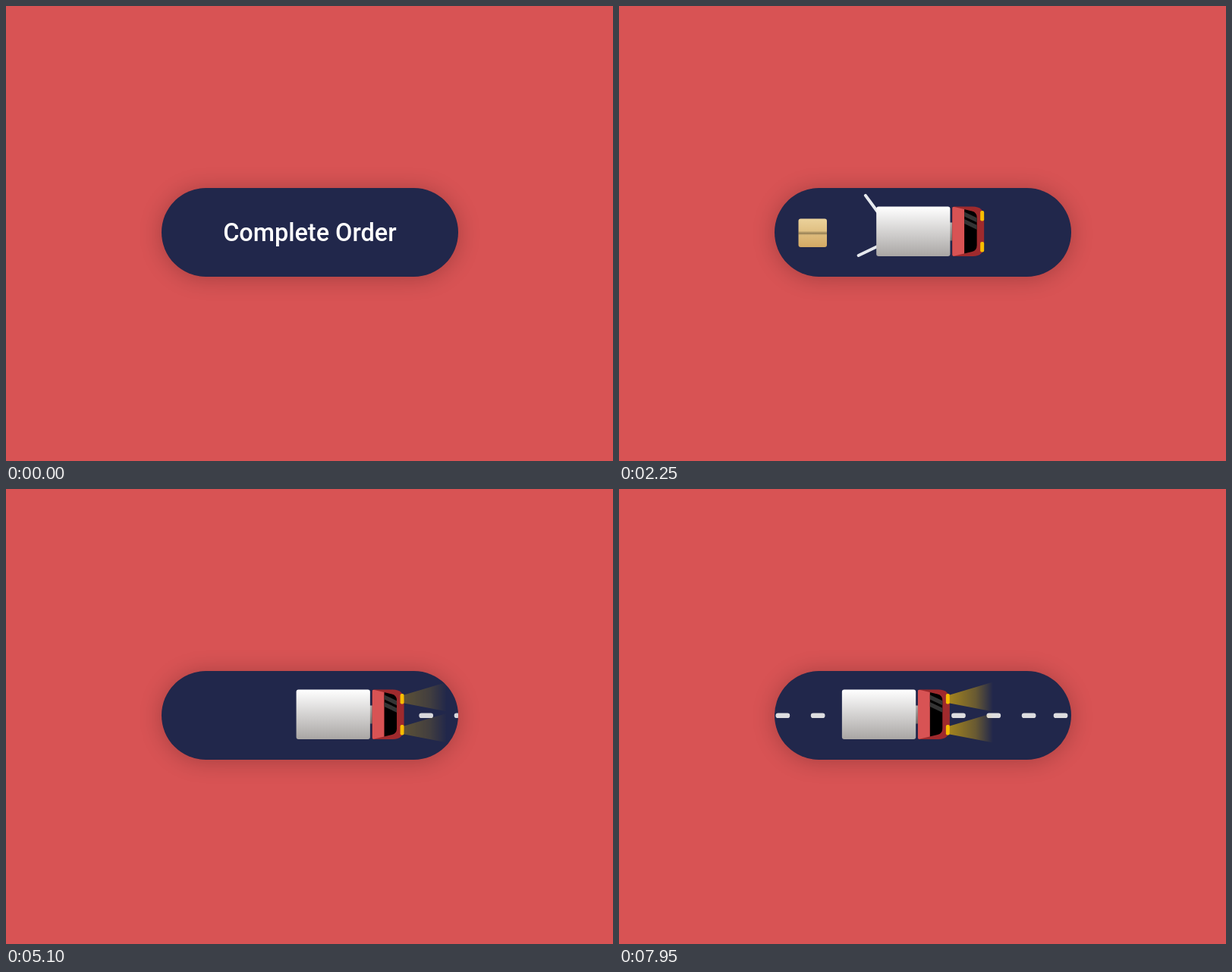
Animation, 800 px wide and 600 px high, one loop 8000 ms. Source, as an HTML page:

```html
<!DOCTYPE html>
<html lang="en">
<head>
<meta charset="utf-8">
<title>Complete Order</title>
<style>
  html, body { margin: 0; width: 100%; height: 100%; overflow: hidden; background: #d85354; }
  #button {
    position: absolute; left: 204.5px; top: 239.5px; width: 391.8px; height: 117.6px;
    border-radius: 58.8px; overflow: hidden; background: #21274b;
    box-shadow: 0 2px 30px rgba(0, 0, 0, .24);
  }
  #label {
    position: absolute; inset: 0; text-align: center; color: #fff;
    font: 500 32.4px/119px Roboto, sans-serif;
  }
  svg { position: absolute; inset: 0; width: 100%; height: 100%; }
</style>
</head>
<body>
<div id="button">
  <div id="label">Complete Order</div>
  <svg viewBox="204.5 239.5 391.8 117.6">
    <defs>
      <linearGradient id="trailer" x2="0" y2="1"><stop stop-color="#fff"/><stop offset="1" stop-color="#a9a6a4"/></linearGradient>
      <linearGradient id="hitch" x2="0" y2="1"><stop stop-color="#b0adab"/><stop offset="1" stop-color="#706d6b"/></linearGradient>
      <linearGradient id="carton" x2="0" y2="1"><stop stop-color="#ebd29b"/><stop offset="1" stop-color="#d3a964"/></linearGradient>
      <linearGradient id="beam">
        <stop stop-color="#f8c000" stop-opacity=".6"/>
        <stop offset=".6" stop-color="#f8c000" stop-opacity=".33"/>
        <stop offset="1" stop-color="#f8c000" stop-opacity="0"/>
      </linearGradient>
      <clipPath id="panel"><path d="M102 .2Q100 0 100 2V63.5Q100 65.5 102 65.300L126 59.500Q132.5 58 132.5 51V14.500Q132.5 7.500 126 6Z"/></clipPath>
    </defs>
    <g id="lines" fill="#dddde0"></g>
    <g id="box">
      <rect width="37.5" height="37.5" y="280" rx="3" fill="url(#carton)"/>
      <path d="M0 296.5h37.5v5H0z" fill="#000" opacity=".1"/>
      <path d="M0 298.3h37.5v1.6H0z" fill="#000" opacity=".25"/>
    </g>
    <g id="truck">
      <g stroke="#e6e9ee" stroke-width="4" stroke-linecap="round">
        <path id="doorTop" d="M3.5 9.5h-30"/>
        <path id="doorBottom" d="M3.5 51.5h-30"/>
      </g>
      <rect x="96" y="21" width="5" height="24" fill="url(#hitch)"/>
      <rect width="97.3" height="65.5" rx="3" fill="url(#trailer)"/>
      <path d="M103 0H127Q142 0 142 15V50.5Q142 65.5 127 65.5H103Q100 65.5 100 62.5V3Q100 0 103 0Z" fill="#9f2a2d"/>
      <g clip-path="url(#panel)">
        <path d="M100 0h16v66h-16z" fill="#d85354"/>
        <path d="M116 0h17v66h-17z"/>
        <path d="M116 7l17 8v6l-17-8zM116 16.5l17 8v6l-17-8z" fill="#343434"/>
      </g>
      <g fill="url(#beam)" id="beams">
        <path d="M142 7L199 -10V29L142 18Z"/>
        <path d="M142 48L199 31V70L142 59Z"/>
      </g>
      <g fill="#f8bd00">
        <rect x="137" y="5.5" width="5" height="13.5" rx="2"/>
        <rect x="137" y="46.5" width="5" height="13.5" rx="2"/>
      </g>
    </g>
  </svg>
</div>
<script>
const LOOP = 8000, CLICK = 1260;
const el = id => document.getElementById(id);
const clamp = v => Math.min(1, Math.max(0, v));

// CSS "ease": cubic-bezier(.25, .1, .25, 1)
function ease(x) {
  let low = 0, high = 1;
  for (let i = 0; i < 24; i++) {
    const s = (low + high) / 2;
    if (.75 * s * (1 - s) + s ** 3 < x) low = s; else high = s;
  }
  const s = low, r = 1 - s;
  return .3 * s * r * r + 3 * s * s * r + s ** 3;
}

// Keys are [time, value] pairs, eased separately between neighbours.
function track(t, keys) {
  if (t <= keys[0][0]) return keys[0][1];
  for (let i = 1; i < keys.length; i++) {
    const [t0, a] = keys[i - 1], [t1, b] = keys[i];
    if (t < t1) return a + (b - a) * ease(clamp((t - t0) / (t1 - t0)));
  }
  return keys[keys.length - 1][1];
}

const PRESS = [[750, 1], [1050, .96], [CLICK, .96], [CLICK + 300, 1]];
const LABEL = [[CLICK, 1], [CLICK + 300, 0]];
const TRUCK = [[CLICK, 636], [2360, 337], [4800, 337], [5890, 434], [7778, 240], [9175, 636]];
const BOX = [[CLICK, 166], [2140, 236], [2360, 236], [3500, 368]];
const BEAMS = [[4800, 0], [5890, 1]];
const LINES = [[4728, 0], [11968, 1525]];
const LINES_FADE = [[4728, 0], [5180, 1]];
const door = start => [[start, -90], [start + 790, 55], [start + 1320, 55], [start + 2640, -90]];
const DOOR_TOP = door(CLICK + 300), DOOR_BOTTOM = door(CLICK + 600);

// The road marking has one slightly shorter gap.
for (let i = 0; i < 42; i++) {
  const x = 596.3 + i * 46.33 - (i > 23 ? 4.4 : 0);
  el('lines').innerHTML += `<rect x="${x}" y="295.1" width="18.7" height="6.5" rx="3.1"/>`;
}

function move(id, transform) { el(id).setAttribute('transform', transform); }

function draw(t) {
  el('button').style.transform = `scale(${track(t, PRESS)})`;
  el('label').style.opacity = track(t, LABEL);
  move('truck', `translate(${track(t, TRUCK)} 264)`);
  move('box', `translate(${track(t, BOX)} 0)`);
  el('box').style.opacity = t < 4000 ? 1 : 0;
  move('doorTop', `rotate(${track(t, DOOR_TOP)} 3.5 9.5)`);
  move('doorBottom', `rotate(${-track(t, DOOR_BOTTOM)} 3.5 51.5)`);
  el('beams').style.opacity = track(t, BEAMS);
  move('lines', `translate(${-track(t, LINES)} 0)`);
  el('lines').style.opacity = track(t, LINES_FADE);
}

const start = performance.now();
function tick() {
  draw((performance.now() - start) % LOOP);
  requestAnimationFrame(tick);
}
tick();
</script>
</body>
</html>
```
